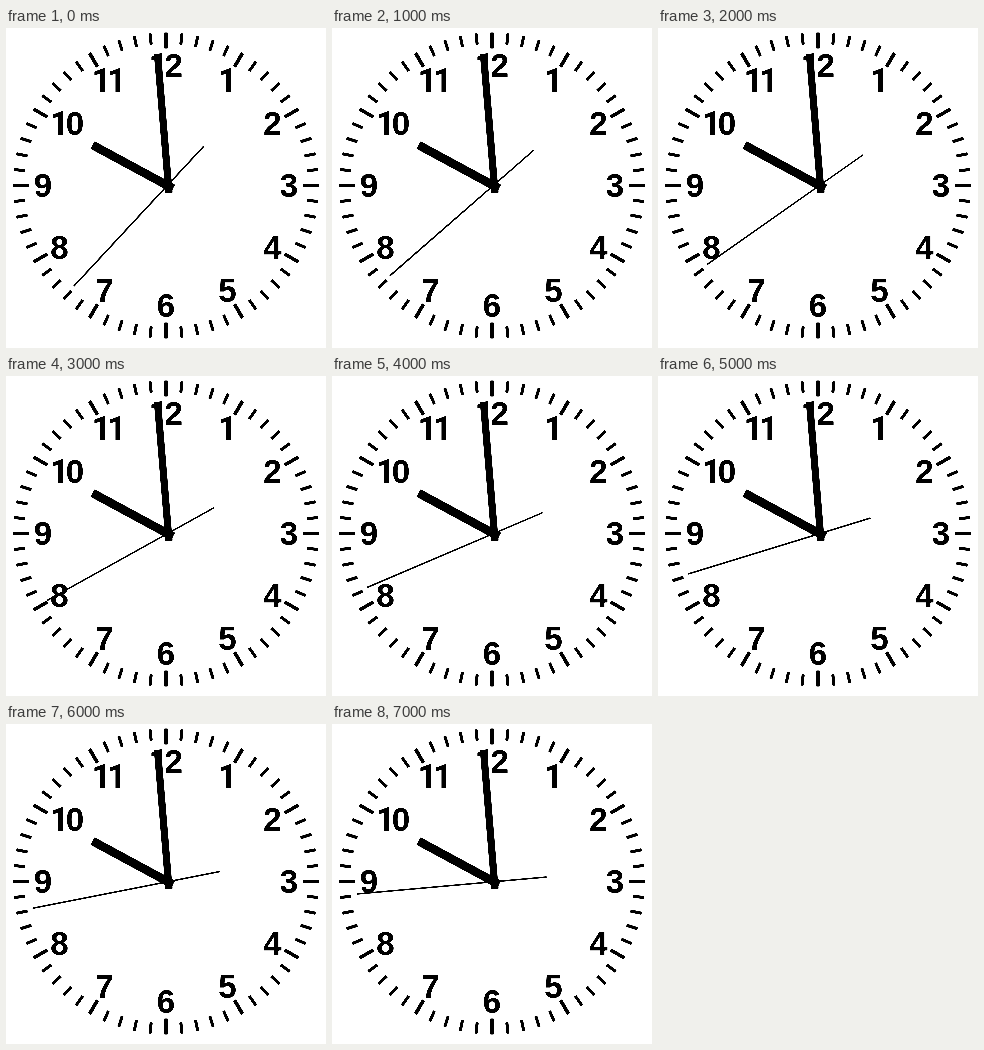
Write an HTML page with a canvas that moves like this. It is 320 px wide and 320 px high and loops after 8 s.

```html
<!DOCTYPE html>
<html lang="en">
<head>
<meta charset="utf-8">
<title>Clock</title>
<style>
  html, body { margin: 0; width: 100%; height: 100%; overflow: hidden; background: #fff; }
  canvas { display: block; filter: contrast(4); } /* hard edges */
</style>
</head>
<body>
<canvas id="clock" width="320" height="320"></canvas>
<script>
const ctx = document.getElementById('clock').getContext('2d');
const START_SECOND = 37.15, LOOP = 8000;
const CX = 160, CY = 157.5, DIGIT_STEP = 15.5;

function line(x1, y1, x2, y2, width) {
  ctx.lineWidth = width;
  ctx.beginPath();
  ctx.moveTo(x1, y1);
  ctx.lineTo(x2, y2);
  ctx.stroke();
}

// Line along a clock direction, between two signed radii
function radial(cx, cy, minute, from, to, width) {
  const a = minute * Math.PI / 30, s = Math.sin(a), c = -Math.cos(a);
  line(cx + s * from, cy + c * from, cx + s * to, cy + c * to, width);
}

// Numerals follow a slightly squared ring; wide ones sit closer in
function drawNumeral(hour) {
  const a = hour * Math.PI / 6, digits = [...String(hour)];
  const x = CX + (hour > 9 ? 114 : 123) * Math.sin(a);
  const y = CY + 11.3 - 121.5 * Math.cos(a) + 1.5 * Math.cos(3 * a);
  digits.forEach((digit, i) => {
    // Roboto has a "1" without a foot
    const family = digit === '1' ? 'Roboto' : '"Liberation Sans", Arial';
    ctx.font = `bold 33px ${family}, sans-serif`;
    ctx.fillText(digit, x + (i - (digits.length - 1) / 2) * DIGIT_STEP, y);
  });
}

function draw(now) {
  const second = START_SECOND + Math.floor(now % LOOP / 1000);
  ctx.fillStyle = '#fff';
  ctx.fillRect(0, 0, 320, 320);
  ctx.fillStyle = ctx.strokeStyle = '#000';
  ctx.textAlign = 'center';

  for (let m = 0; m < 60; m++) {
    const isHour = m % 5 === 0;
    radial(CX, CY, m, isHour ? 137 : 141.5, 153, isHour ? 3.6 : 3);
  }
  for (let hour = 1; hour <= 12; hour++) drawNumeral(hour);

  line(86.5, 117, 167, 160.5, 8.8);
  line(151.5, 26, 163, 165, 7.2);
  radial(161, 157.8, second, -54, 137, 1.5);
  requestAnimationFrame(draw);
}
requestAnimationFrame(draw);
</script>
</body>
</html>
```
